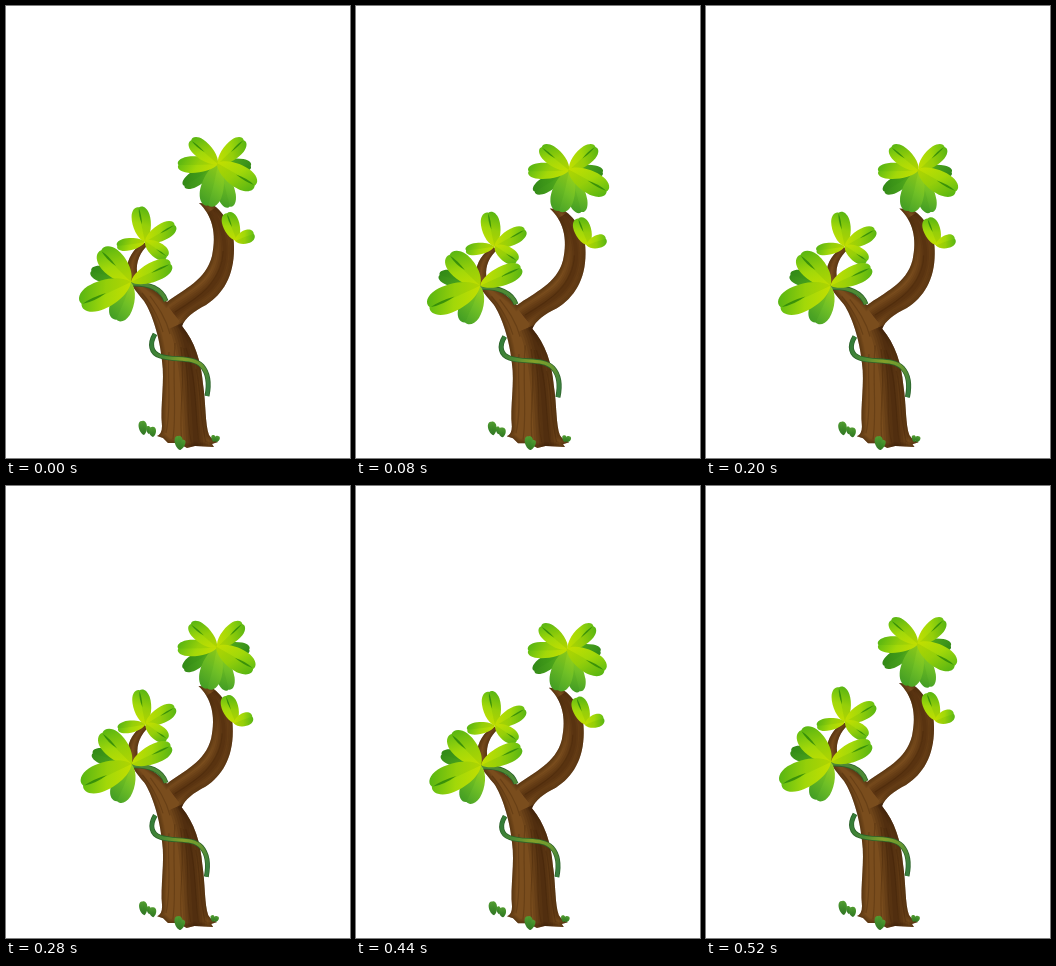
An HTML page with a canvas for the animation above (1000 ms loop, 344 px wide and 452 px high).

```html
<!DOCTYPE html>
<html lang="en">
<head>
<meta charset="utf-8">
<title>Springy tree</title>
<style>
  html, body { margin: 0; height: 100%; overflow: hidden; background: #fff; }
  canvas { display: block; }
</style>
</head>
<body>
<canvas id="stage" width="344" height="452"></canvas>
<script>
const ctx = document.getElementById('stage').getContext('2d');
const LOOP = 1000, STEP = 40;
const ROOT = { x: 162, y: 444 };

// time, horizontal scale, vertical scale
const POSES = [
  [0, 1, 1], [80, 1.023, .978], [200, 1.011, .978], [280, .982, .988],
  [360, .991, .978], [440, .996, .981], [520, 1, 1]
];

const BRIGHT = ['#c3df00', '#a2d809', '#60bc13'];
const MID = ['#9bd31a', '#6fbf26', '#47a127'];
const DARK = ['#6cb81a', '#469f1b', '#348a18'];
const GRASS = ['#317425', '#3f8b2a', '#569f34'];

const leafShape = new Path2D('M0 0C.12-.4 .5-.58 .76-.5C.95-.43 1.04-.2 .99 0C1.04 .2 .95 .43 .76 .5C.5 .58 .12 .4 0 0Z');
const leafHalf = new Path2D('M0 0Q.5-.06 .99 0C1.04 .2 .95 .43 .76 .5C.5 .58 .12 .4 0 0Z');
const leafCrease = new Path2D('M.5 0Q.75-.12 .97-.02Q.78 .07 .5 0Z');

const wood = new Path2D(`M151 430Q156 428 156 420C154 400 159 375 156 355
  C154 332 146 307 138 295C129 284 121 275 121 264C121 252 128 243 137 236
  L142 239C134 246 130 256 131 266C133 277 151 283 161 296
  C178 283 200 274 206 250C211 227 206 209 193 197L206 198
  C220 208 229 225 228 243C228 270 217 288 200 299C188 305 179 312 176 320
  C189 336 195 355 197 378C200 398 199 418 203 429Q206 434 212 436
  L206 438L208 441L189 440L181 442L172 437L162 437L157 432Z`);

const grain = new Path2D(`M160 427C166 400 161 372 163 346M167 433C171 402 166 374 169 337
  M176 436C172 405 180 376 175 341M185 436C179 403 185 375 178 342
  M193 436C189 407 191 374 180 342M200 436C193 410 196 390 190 363
  M157 326C151 307 145 298 136 287M164 328C160 312 152 301 144 290
  M169 306C192 292 216 276 217 245`);

const trunkShade = new Path2D('M174 318C186 345 187 390 190 440');
const branchShade = new Path2D('M168 308C190 291 212 286 218 255Q222 228 206 204');

const vineBack = new Path2D('M125 278C143 277 156 283 160 295');
const vineFront = new Path2D('M149 328C143 338 145 347 154 350C168 355 187 350 196 360C203 368 203 380 201 390');

// base x, base y, tip x, tip y, width, palette, crease
const leaves = [
  [212, 158, 178, 180, 15, DARK], [212, 158, 245, 160, 13, DARK],
  [212, 158, 224, 201, 18, MID], [212, 158, 202, 200, 22, MID],
  [212, 158, 172, 159, 16, BRIGHT], [212, 158, 185, 134, 17, BRIGHT, 1],
  [212, 158, 238, 134, 17, BRIGHT, 1], [211, 157, 249, 180, 22, BRIGHT, 1],

  [139, 236, 133, 201, 18, BRIGHT, 1], [139, 236, 169, 219, 16, BRIGHT, 1],
  [139, 236, 111, 240, 12, BRIGHT], [139, 235, 161, 251, 15, BRIGHT, 1],

  [231, 235, 221, 207, 16, BRIGHT, 1], [229, 235, 248, 228, 13, BRIGHT],

  [125, 276, 85, 265, 16, DARK], [125, 276, 110, 314, 22, MID],
  [125, 276, 95, 244, 24, BRIGHT, 1], [125, 276, 165, 258, 19, BRIGHT, 1],
  [125, 276, 75, 298, 27, BRIGHT, 1],

  [138, 429, 136, 415, 8, GRASS], [143, 428, 142, 420, 4, GRASS],
  [147, 431, 146, 421, 7, GRASS], [174, 444, 172, 430, 8, GRASS],
  [174, 444, 178, 434, 5, GRASS], [208, 436, 207, 429, 4, GRASS],
  [210, 436, 212, 430, 5, GRASS]
];

function gradient(x0, y0, x1, y1, colors) {
  const g = ctx.createLinearGradient(x0, y0, x1, y1);
  colors.forEach((c, i) => g.addColorStop(i / (colors.length - 1), c));
  return g;
}

function stroke(path, style, width) {
  ctx.strokeStyle = style;
  ctx.lineWidth = width;
  ctx.stroke(path);
}

function softStroke(path, color, width) {
  for (let k = 1; k > 0; k -= .2) stroke(path, color, width * k);
}

function drawLeaf([x, y, tx, ty, width, colors, crease]) {
  const dx = tx - x, dy = ty - y;
  ctx.save();
  ctx.translate(x, y);
  ctx.rotate(Math.atan2(dy, dx));
  ctx.scale(Math.hypot(dx, dy), width);
  ctx.fillStyle = gradient(0, -.1, 1, .15, colors);
  ctx.fill(leafShape);
  ctx.fillStyle = 'rgba(35,130,10,.1)';
  ctx.fill(leafHalf);
  if (crease) {
    ctx.fillStyle = 'rgba(20,115,8,.65)';
    ctx.fill(leafCrease);
  }
  ctx.restore();
}

function drawWood() {
  ctx.save();
  ctx.clip(wood);
  ctx.fillStyle = '#7a4d1d';
  ctx.fillRect(100, 190, 140, 260);
  softStroke(branchShade, 'rgba(45,22,3,.11)', 18);
  softStroke(trunkShade, 'rgba(45,22,3,.13)', 24);
  softStroke(wood, 'rgba(50,25,4,.09)', 9);
  stroke(grain, 'rgba(57,29,5,.28)', 1.2);
  ctx.restore();
}

function drawVine(path, colors) {
  stroke(path, '#2c6329', 5);
  stroke(path, gradient(143, 340, 205, 375, colors), 3.4);
}

function drawTree() {
  drawWood();
  drawVine(vineBack, ['#4d8a35', '#34783a']);
  drawVine(vineFront, ['#347d38', '#4b8a35', '#82a02a', '#6b982f', '#3a8040']);
  leaves.forEach(drawLeaf);
}

function poseAt(t) {
  const i = POSES.findIndex(p => p[0] > t);
  if (i < 0) return [1, 1];
  const a = POSES[i - 1], b = POSES[i];
  const k = (t - a[0]) / (b[0] - a[0]);
  return [1, 2].map(n => a[n] + (b[n] - a[n]) * k);
}

function frame() {
  const t = Math.floor(performance.now() % LOOP / STEP) * STEP;
  const [sx, sy] = poseAt(t);
  ctx.clearRect(0, 0, 344, 452);
  ctx.save();
  ctx.translate(ROOT.x, ROOT.y);
  ctx.scale(sx, sy);
  ctx.translate(-ROOT.x, -ROOT.y);
  drawTree();
  ctx.restore();
  requestAnimationFrame(frame);
}
frame();
</script>
</body>
</html>
```
